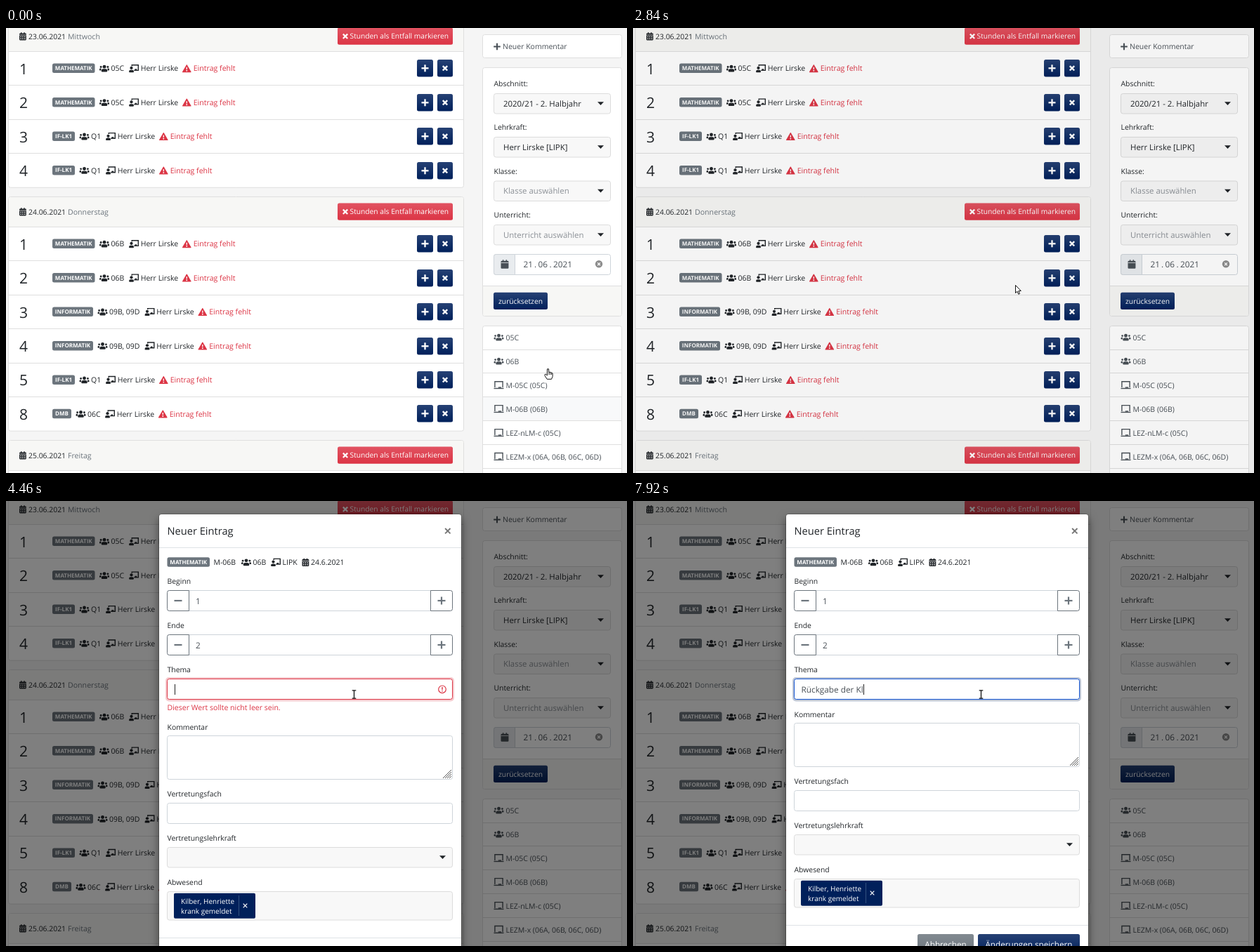
Recreate the animation shown at these times as an HTML page with a canvas. Size 884 px wide and 634 px high, loop 8 s.

```html
<!DOCTYPE html>
<html lang="de">
<head>
<meta charset="utf-8">
<title>Neuer Eintrag</title>
<style>
html, body { margin: 0; width: 100%; height: 100%; overflow: hidden; background: #f5f5f5; }
canvas { display: block; width: 884px; height: 634px; }
</style>
</head>
<body>
<canvas id="stage" width="884" height="634"></canvas>
<script>
const W = 884, H = 634, LOOP = 8000;
const DARK = '#212529', GRAY = '#6c757d', MID = '#495057', RED = '#dc3545', NAVY = '#00205b';
const LINE = '#dfdfdf', FIELD = '#ced4da', SOFT = '#f8f8f8';
const TEACHER = 'Herr Lirske', CODE = 'LIPK';

const main = document.getElementById('stage').getContext('2d');
const layer = document.createElement('canvas');
layer.width = W;
layer.height = H;
const over = layer.getContext('2d');
main.textRendering = over.textRendering = 'geometricPrecision';
let c = main;

// ---------- helpers ----------
function text(s, x, cy, size = 10.5, color = DARK, align = 'left', weight = 400) {
  c.font = `${weight} ${size}px "Open Sans", "Noto Sans", sans-serif`;
  c.textAlign = align;
  c.fillStyle = color;
  c.fillText(s, x, Math.round(cy + size * 0.36));
}

function box(x, y, w, h, r, fill, stroke, lw = 1) {
  c.beginPath();
  c.roundRect(x, y, w, h, r);
  if (fill) { c.fillStyle = fill; c.fill(); }
  if (stroke) { c.strokeStyle = stroke; c.lineWidth = lw; c.stroke(); }
}

// A white panel with a soft shadow below it.
function raised(x, y, w, h, r, alpha) {
  c.save();
  c.shadowColor = `rgba(0,0,0,${alpha})`;
  c.shadowBlur = 12.5;
  c.shadowOffsetY = 6.2;
  box(x, y, w, h, r, '#fff');
  c.restore();
}

function hline(x1, x2, y, color = LINE) {
  c.fillStyle = color;
  c.fillRect(x1, y, x2 - x1, 1);
}

function poly(points, close) {
  c.beginPath();
  points.forEach(([x, y]) => c.lineTo(x, y));
  if (close) c.closePath();
}

function disc(x, y, r) {
  c.beginPath();
  c.arc(x, y, r, 0, 7);
  c.fill();
}

function shaded(x, y, w, h, top, bottom) {
  const g = c.createLinearGradient(0, y, 0, y + h);
  g.addColorStop(0, top);
  g.addColorStop(1, bottom);
  box(x, y, w, h, 2.5, g);
}
const navyButton = (x, y, w, h) => shaded(x, y, w, h, '#264174', NAVY);

function cross(x, y, r, color, lw) {
  c.strokeStyle = color;
  c.lineWidth = lw;
  c.beginPath();
  c.moveTo(x - r, y - r); c.lineTo(x + r, y + r);
  c.moveTo(x + r, y - r); c.lineTo(x - r, y + r);
  c.stroke();
}

function plus(x, y, r, color, lw, minus) {
  c.fillStyle = color;
  c.fillRect(x - r, y - lw / 2, 2 * r, lw);
  if (!minus) c.fillRect(x - lw / 2, y - r, lw, 2 * r);
}

function caretDown(x, y) {
  c.fillStyle = DARK;
  poly([[x - 4.5, y - 2.3], [x + 4.5, y - 2.3], [x, y + 2.5]], true);
  c.fill();
}

// Icons are drawn on a grid 512 units high.
const icons = {
  users() {
    disc(96, 160, 64); disc(544, 160, 64); disc(320, 144, 112);
    const f = c.fillStyle;
    box(128, 288, 384, 192, [115, 115, 48, 48], f);
    box(0, 256, 112, 128, [64, 0, 0, 32], f);
    box(528, 256, 112, 128, [0, 64, 32, 0], f);
  },
  teacher() {
    disc(160, 224, 96);
    box(0, 352, 320, 160, [112, 112, 48, 48], c.fillStyle);
    c.lineWidth = 64;
    poly([[192, 100], [192, 32], [608, 32], [608, 384], [330, 384]]);
    c.stroke();
    c.fillRect(384, 288, 128, 100);
  },
  board() {
    c.lineWidth = 64;
    poly([[64, 416], [64, 32], [576, 32], [576, 416]]);
    c.stroke();
    c.fillRect(288, 384, 192, 64);
    c.fillRect(0, 448, 640, 64);
  },
  warn() {
    c.lineWidth = 48; c.lineJoin = 'round';
    poly([[288, 30], [552, 486], [24, 486]], true);
    c.fill(); c.stroke();
    c.lineJoin = 'miter';
    c.fillStyle = '#fff';
    c.fillRect(258, 170, 60, 150);
    disc(288, 402, 44);
  },
  calendar(hole, dots) {
    box(0, 64, 448, 448, 48, c.fillStyle);
    c.fillRect(96, 0, 64, 80); c.fillRect(288, 0, 64, 80);
    c.fillStyle = hole;
    c.fillRect(0, 160, 448, 32);
    if (!dots) return;
    for (let i = 0; i < 6; i++) c.fillRect(64 + i % 3 * 128, 256 + (i > 2) * 128, 64, 64);
  }
};
function icon(name, x, cy, color = DARK, size = 11.2, ...opts) {
  c.save();
  c.translate(x, cy - size / 2);
  c.scale(size / 512, size / 512);
  c.fillStyle = c.strokeStyle = color;
  icons[name](...opts);
  c.restore();
}

function badge(s, x, cy, w, color = GRAY) {
  box(x, cy - 7, w, 13.5, 2.5, color);
  text(s, x + w / 2, cy - 0.4, 8, '#fff', 'center', 700);
}

// ---------- page ----------
const subjects = { M: ['MATHEMATIK', 60.5, 175], L: ['IF-LK1', 32, 142], I: ['INFORMATIK', 58, 197.5], D: ['DMB', 27, 141] };
const days = [
  [-10, '23.06.2021', 'Mittwoch', [[1, 'M', '05C'], [2, 'M', '05C'], [3, 'L', 'Q1'], [4, 'L', 'Q1']]],
  [240, '24.06.2021', 'Donnerstag', [[1, 'M', '06B'], [2, 'M', '06B'], [3, 'I', '09B, 09D'], [4, 'I', '09B, 09D'], [5, 'L', 'Q1'], [8, 'D', '06C']]],
  [587, '25.06.2021', 'Freitag', [[1, 'M', '06B']]]
];
const ROW = 48.45;

function lesson([num, key, group], top) {
  const [name, w, x] = subjects[key], cy = top + 24.6;
  text(num, 19, cy + 0.5, 21);
  badge(name, 66, cy, w);
  icon('users', 66 + w + 6.5, cy);
  text(group, 66 + w + 23, cy);
  icon('teacher', x, cy);
  text(TEACHER, x + 16.7, cy);
  icon('warn', x + 76, cy, RED);
  text('Eintrag fehlt', x + 91.7, cy, 10.6, RED);
  const by = Math.round(cy - 12.4);
  navyButton(585, by, 23, 24.5);
  navyButton(614, by, 22, 24.5);
  plus(596.5, by + 12.3, 5, '#fff', 2.3);
  cross(625, by + 12.3, 3.2, '#fff', 2.4);
}

function dayCard([y, date, day, rows]) {
  const top = y + 43;
  box(3.5, y + 0.5, 648, 43 + rows.length * ROW, 3, '#fff', LINE);
  box(4, y + 1, 647, 42, [3, 3, 0, 0], '#f7f7f5');
  const cy = y + 21.8;
  icon('calendar', 19, cy, DARK, 11.2, '#f7f7f5', true);
  text(date, 32, cy, 10.4);
  text(day, 88, cy, 10.6, GRAY);
  shaded(472, y + 9.5, 164, 24.3, '#e15361', RED);
  cross(483, cy, 3.2, '#fff', 2.2);
  text('Stunden als Entfall markieren', 489.5, cy, 10.25, '#fff');
  rows.forEach((row, i) => {
    hline(4, 651, Math.round(top + i * ROW));
    lesson(row, top + i * ROW);
  });
}

function select(label, value, y, filled) {
  text(label, 694.5, y - 13.5, 10.4);
  box(694.5, y + 0.5, 166, 28.5, 3, SOFT, '#dcdcdc');
  text(value, 708, y + 14.5, 11.4, filled ? DARK : '#8b9096');
  caretDown(846.5, y + 14.5);
}

function sidebar(hover) {
  box(678.5, 9.5, 198, 33, 3, '#fff', LINE);
  plus(699, 26.5, 4.8, MID, 2);
  text('Neuer Kommentar', 707, 26.5, 10.5, MID);

  box(678.5, 56.5, 198, 354, 3, '#fff', LINE);
  select('Abschnitt:', '2020/21 - 2. Halbjahr', 93, true);
  select('Lehrkraft:', `${TEACHER} [${CODE}]`, 155, true);
  select('Klasse:', 'Klasse auswählen', 217.5);
  select('Unterricht:', 'Unterricht auswählen', 280);
  box(694.5, 322.5, 166, 29, 3, '#fff', FIELD);
  box(694.5, 322.5, 30, 29, [3, 0, 0, 3], '#e9ecef', FIELD);
  icon('calendar', 704.5, 336.5, MID, 12.5, '#e9ecef');
  [['21', 736.5], ['.', 752], ['06', 757.5], ['.', 773.5], ['2021', 779]].forEach(([s, x]) => text(s, x, 336.8, 11.8, MID));
  c.fillStyle = '#8d8d8d';
  disc(844, 336.3, 5.2);
  cross(844, 336.3, 1.9, '#fff', 1.3);
  box(679, 367, 197, 43, [0, 0, 3, 3], '#f7f7f5');
  hline(679, 876, 367);
  navyButton(694, 376.7, 77, 24.4);
  text('zurücksetzen', 732.5, 389, 10.25, '#fff', 'center');

  box(678.5, 424.5, 198, 230, 3, '#fff', LINE);
  if (hover) { c.fillStyle = '#f8f9fa'; c.fillRect(679, 526, 197, 33); }
  ['05C', '06B', 'M-05C (05C)', 'M-06B (06B)', 'LEZ-nLM-c (05C)', 'LEZM-x (06A, 06B, 06C, 06D)'].forEach((s, i) => {
    const cy = 441 + i * 33.95;
    icon(i < 2 ? 'users' : 'board', 694.5, cy - 0.3, MID);
    text(s, 711.5, cy, 10.5, MID);
    hline(679, 876, Math.round(cy + 16.5));
  });
}

function activeButton() {
  box(582.5, 292.7, 28, 29.5, 4, 'rgba(38,65,116,.5)');
  box(585, 295.2, 23, 24.5, 2.5, '#00123a');
  plus(596.5, 307.5, 5, '#fff', 2.3);
}

function menu(hover) {
  raised(350.5, 321.5, 257, 58.5, 3, 0.2);
  box(350.5, 321.5, 257, 58.5, 3, '#fff', '#d6d6d6');
  if (hover >= 0) { c.fillStyle = '#e9ecef'; c.fillRect(351, 328.5 + hover * 23, 256, 23); }
  badge('1.', 369, 340.5, 16, NAVY);
  text('Eintrag für Einzelstunde erstellen', 388.5, 340, 11.7);
  badge('1./2.', 369, 363, 28, NAVY);
  text('Eintrag für Doppelstunde erstellen', 401, 362.8, 11.7);
}

function tooltip() {
  c.save();
  c.globalAlpha = 0.92;
  box(558, 325, 77, 22, 3, '#000');
  poly([[592, 325], [597, 320.5], [602, 325]], true);
  c.fill();
  c.restore();
  text('Neuer Eintrag', 596.5, 336.8, 10.4, '#fff', 'center');
}

// ---------- dialog ----------
const FX = 229.5, FW = 406;

function stepper(label, value, y) {
  text(label, FX, y - 12.5, 10.4);
  box(FX, y + 0.5, FW, 29, 3, '#fff', FIELD);
  box(FX, y + 0.5, 31, 29, [3, 0, 0, 3], '#fff', GRAY);
  box(604.5, y + 0.5, 31, 29, [0, 3, 3, 0], '#fff', GRAY);
  plus(245, y + 15, 5.5, GRAY, 2.2, true);
  plus(620, y + 15, 5.5, GRAY, 2.2);
  text(value, 270, y + 15.5, 11.8, MID);
}

function topicField(s) {
  const invalid = s.typed < 0;
  if (s.focus) box(227, 251, 411, 34.5, 5, invalid ? `rgba(220,53,69,${s.focus * 0.25})` : 'rgba(0,32,91,.25)');
  box(FX, 253.5, FW, 29, 3, '#fff', invalid ? RED : '#1455d2');
  if (invalid) {
    c.strokeStyle = RED;
    c.lineWidth = 1.2;
    c.beginPath();
    c.arc(621, 268.3, 5.3, 0, 7);
    c.stroke();
    c.fillStyle = RED;
    c.fillRect(620.3, 265, 1.4, 4);
    c.fillRect(620.3, 270, 1.4, 1.5);
    text('Dieser Wert sollte nicht leer sein.', FX, 294.3, 10.55, RED);
  }
  const value = 'Rückgabe der Klasse'.slice(0, Math.max(0, s.typed));
  text(value, 239.5, 269, 11.8, MID);
  if (s.caret) {
    c.fillStyle = '#222';
    c.fillRect(Math.round(239.5 + c.measureText(value).width), 261, 1, 15);
  }
}

function lowerFields(s) {
  text('Kommentar', FX, 321.8, 10.4);
  box(FX, 334.5, FW, 62, 3, '#fff', FIELD);
  c.strokeStyle = '#555';
  c.lineWidth = 1;
  for (let d = 3; d <= 12; d += 3) {
    poly([[634 - d, 395], [634, 395 - d]]);
    c.stroke();
  }
  text('Vertretungsfach', FX, 417.3, 10.4);
  box(FX, 430.5, FW, 29, 3, '#fff', FIELD);
  text('Vertretungslehrkraft', FX, 480.2, 10.4);
  box(FX, 493.5, FW, 28.5, 3, SOFT, '#dcdcdc');
  caretDown(621.5, 507.5);
  text('Abwesend', FX, 543, 10.4);
  box(FX, 556.5, FW, s.loaded ? 40.5 : 28, 3, SOFT, '#dcdcdc');
  if (s.loaded) {
    box(239, 558.7, 116, 36, 2, NAVY);
    c.fillStyle = '#33507f';
    c.fillRect(331, 562, 1, 29);
    text('Kilber, Henriette', 249, 570.2, 10, '#fff');
    text('krank gemeldet', 249, 584.2, 10, '#fff');
    cross(340.5, 576.5, 2.8, '#fff', 1.2);
  }
  const foot = s.loaded ? 622 : 609;
  hline(218, 648, foot, '#dee2e6');
  shaded(405, foot + 13, 80, 30, '#828a91', GRAY);
  text('Abbrechen', 445, foot + 28, 11.7, '#fff', 'center');
  navyButton(491, foot + 13, 145, 30);
  text('Änderungen speichern', 563.5, foot + 28, 11.7, '#fff', 'center');
}

function dialog(s) {
  c = over;
  c.clearRect(0, 0, W, H);
  c.save();
  c.translate(0, s.shift);
  const height = s.loaded ? 660 : 645;
  raised(218, 19, 430, height, 3, 0.5);
  box(217.5, 18.5, 431, height + 1, 4, null, 'rgba(0,0,0,.2)');
  text('Neuer Eintrag', 229.5, 43, 14.65);
  cross(628.8, 42.7, 3.7, '#777', 1.9);
  hline(218, 648, 66, '#dee2e6');
  if (s.loaded) {
    badge('MATHEMATIK', 229.5, 87.3, 60.5);
    text('M-06B', 295.5, 87.3);
    icon('users', 335, 87.3);
    text('06B', 351.5, 87.3);
    icon('teacher', 377, 87.3);
    text(CODE, 393.5, 87.3);
    icon('calendar', 421.5, 87.3, DARK, 11.2, '#fff', true);
    text('24.6.2021', 434, 87.3);
  } else {
    c.fillStyle = DARK;
    for (let a = 0; a < 8; a++) disc(235.5 + 4.5 * Math.cos(a * Math.PI / 4), 87 + 4.5 * Math.sin(a * Math.PI / 4), 0.9);
    icon('calendar', 247.5, 87.3, DARK, 11.2, '#fff', true);
    text('24.6.2021', 260, 87.3);
  }
  stepper('Beginn', '1', 127);
  stepper('Ende', '2', 190);
  text('Thema', FX, 240.5, 10.4);
  topicField(s);
  c.translate(0, s.low);
  lowerFields(s);
  c.restore();
  c = main;
  c.globalAlpha = s.fade;
  c.drawImage(layer, 0, 0);
  c.globalAlpha = 1;
}

// ---------- pointer ----------
const hand = [[-1, 0.3], [1, 0.3], [1.3, 5], [3, 4.8], [5, 5.5], [6.6, 6.6], [6.6, 11], [5, 14.8], [-1.3, 14.8], [-4.4, 10], [-4.4, 8], [-3, 7.8], [-1.2, 9.5]];
const arrow = [[0, 0], [0, 11], [2.5, 8.8], [4.3, 12.8], [6, 12], [4.3, 8.2], [7.8, 8]];

function pointer([x, y, kind]) {
  c.save();
  c.translate(x + 0.5, y + 0.5);
  c.lineJoin = 'round';
  if (kind === 'beam') {
    c.strokeStyle = '#111';
    c.lineWidth = 1.3;
    c.beginPath();
    c.moveTo(0, -5.5); c.lineTo(0, 5.5);
    c.moveTo(-2.8, -5.7); c.lineTo(2.8, -5.7);
    c.moveTo(-2.8, 5.7); c.lineTo(2.8, 5.7);
    c.stroke();
  } else {
    poly(kind === 'hand' ? hand : arrow, true);
    c.fillStyle = '#fff';
    c.fill();
    c.strokeStyle = '#111';
    c.lineWidth = 1;
    c.stroke();
    if (kind === 'hand') {
      c.lineWidth = 0.8;
      [1.3, 3.2, 5].forEach((px, i) => { poly([[px, 5 + i * 0.4], [px, 8.5]]); c.stroke(); });
    }
  }
  c.restore();
}

// ---------- timeline: each value holds until the next step ----------
const path = [
  [0, 771, 485, 'hand'], [200, 752, 462, 'hand'], [400, 690, 396, 'hand'], [600, 625, 331, 'arrow'],
  [800, 602, 311, 'hand'], [1020, 600, 308, 'hand'], [1420, 594, 322, 'hand'], [1620, 576, 345, 'hand'],
  [1820, 557, 360, 'hand'], [2040, 547, 365, 'hand'], [2240, 544, 366, 'hand'], [2840, 544, 366, 'arrow'],
  [3240, 544, 365, 'beam'], [3660, 540, 352, 'beam'], [3860, 512, 305, 'beam'], [4060, 495, 275, 'beam']
];
const typing = [[0, -1], [6300, 1], [6500, 3], [6720, 5], [6920, 7], [7120, 9], [7320, 11], [7520, 13], [7920, 15]];
const shade = [[0, 0], [2840, 0.045], [3040, 0.43], [3240, 0.5]];
const held = (steps, t) => steps.findLast(s => s[0] <= t).slice(1);
const within = (t, a, b) => t >= a && t < b;

function draw(t) {
  c = main;
  c.fillStyle = '#f5f5f5';
  c.fillRect(0, 0, W, H);
  days.forEach(dayCard);
  sidebar(t < 200);
  if (within(t, 1020, 2840)) activeButton();
  if (within(t, 1220, 2840)) menu(t >= 1820 ? 1 : t >= 1620 ? 0 : -1);
  if (within(t, 1020, 1620)) tooltip();
  c.fillStyle = `rgba(0,0,0,${held(shade, t)[0]})`;
  c.fillRect(0, 0, W, H);
  if (t >= 3040) {
    const typed = held(typing, t)[0];
    dialog({
      typed,
      fade: t < 3240 ? 0.38 : 1,
      shift: t < 3240 ? -31 : 0,
      loaded: t >= 3240,
      low: typed >= 0 ? -18 : 0,
      focus: t < 4260 ? 0 : t < 4460 ? 0.5 : 1,
      caret: within(t, 4260, 4880) || within(t, 5480, 6100) || t >= 6300
    });
  }
  pointer(held(path, t));
}

const start = performance.now();
function tick() {
  draw((performance.now() - start) % LOOP);
  requestAnimationFrame(tick);
}
tick();
</script>
</body>
</html>
```
